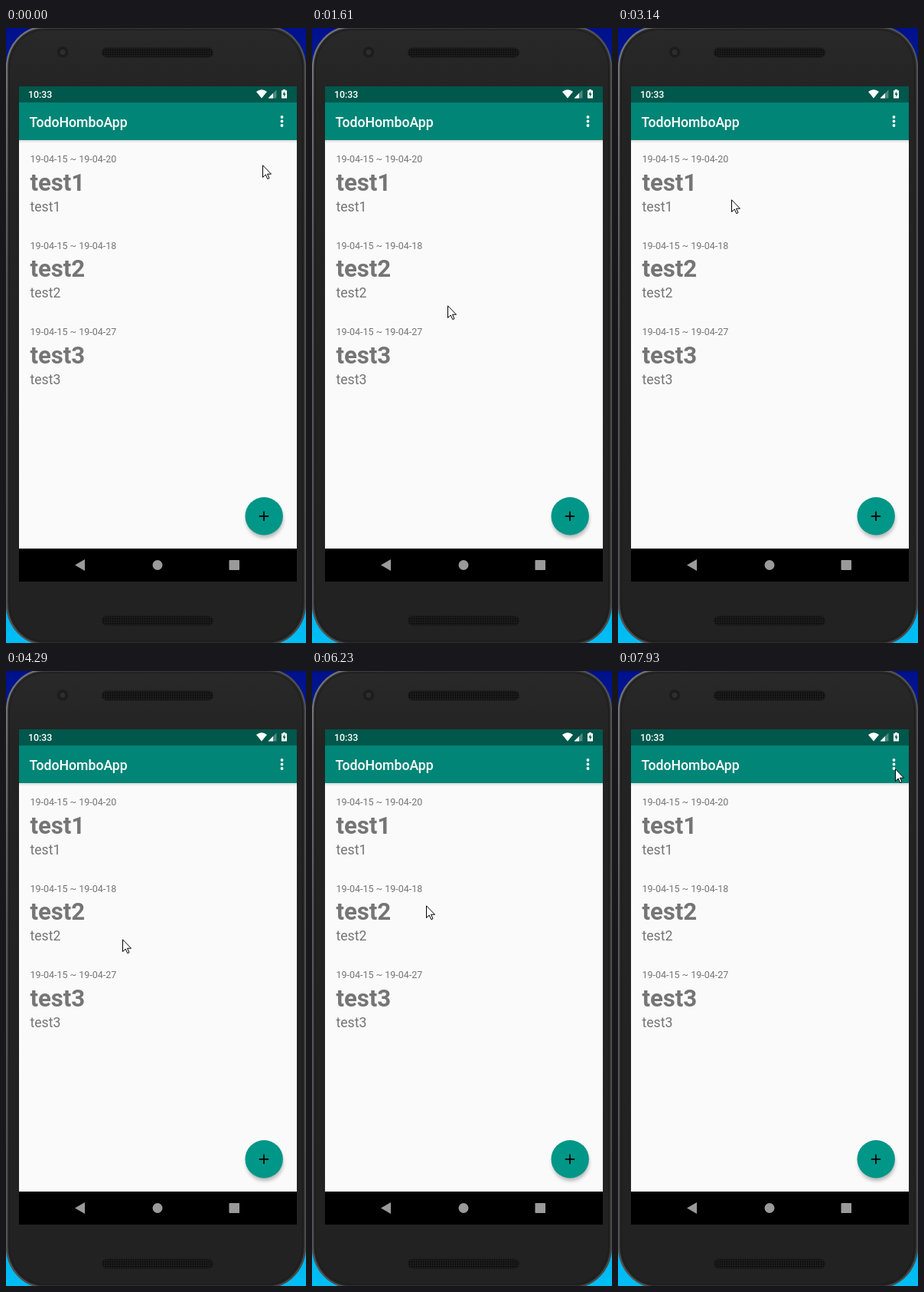
Write an HTML page that moves like this. It is 392 by 801 pixels and loops after 8000 ms.

```html
<!DOCTYPE html>
<html lang="en">
<head>
<meta charset="utf-8">
<title>Memo list</title>
<style>
html, body { margin: 0; width: 100%; height: 100%; overflow: hidden; }
svg { display: block; width: 392px; height: 801px; font-family: Roboto, sans-serif; }
.date { font-size: 12.5px; }
.head { font-size: 31.2px; font-weight: 700; }
.note { font-size: 17.66px; }
.bar { fill: #fff; font-weight: 500; }
</style>
</head>
<body>
<svg viewBox="0 0 392 801">
  <defs>
    <linearGradient id="sky" x2="0" y2="1">
      <stop stop-color="#00108c"/><stop offset=".5" stop-color="#0060c0"/><stop offset="1" stop-color="#00bff5"/>
    </linearGradient>
    <linearGradient id="shell" x2="0" y2="1">
      <stop stop-color="#292929"/><stop offset=".12" stop-color="#232323"/><stop offset="1" stop-color="#222"/>
    </linearGradient>
    <linearGradient id="rim" x2="1" y2="1">
      <stop stop-color="#777"/><stop offset=".2" stop-color="#555"/><stop offset="1" stop-color="#484848"/>
    </linearGradient>
    <linearGradient id="drop" x2="0" y2="1">
      <stop stop-opacity=".13"/><stop offset="1" stop-opacity="0"/>
    </linearGradient>
    <pattern id="mesh" width="3" height="3" patternUnits="userSpaceOnUse">
      <rect width="3" height="3" fill="#1d1d1d"/><circle cx="1.5" cy="1.5" r="1" fill="#070707"/>
    </pattern>
    <filter id="blur" x="-30%" y="-30%" width="160%" height="160%"><feGaussianBlur stdDeviation="2.6"/></filter>
  </defs>

  <rect width="392" height="801" fill="url(#sky)"/>
  <rect x="1" y="-1" width="390" height="803" rx="48" ry="53" fill="url(#shell)" stroke="url(#rim)" stroke-width="2.5"/>
  <rect x="4.5" y="2.5" width="383" height="796" rx="45" ry="50" fill="none" stroke="#1b1b1b"/>
  <g fill="url(#mesh)" stroke="#191919">
    <rect x="125.5" y="26" width="145" height="12" rx="6"/>
    <rect x="125.5" y="766" width="145" height="12" rx="6"/>
  </g>
  <circle cx="74" cy="31.5" r="7.5" fill="#1c1c1c" stroke="#262626"/>
  <circle cx="74" cy="31.5" r="3.5" fill="#2c2e32"/>

  <rect x="17" y="76" width="363" height="645" fill="#fafafa"/>
  <rect x="17" y="76" width="363" height="21" fill="#00574b"/>
  <rect x="17" y="97" width="363" height="49" fill="#008577"/>
  <rect x="17" y="146" width="363" height="4" fill="url(#drop)"/>
  <rect x="17" y="678" width="363" height="43"/>

  <text class="bar" x="29" y="91" font-size="12.36">10:33</text>
  <text class="bar" x="30.5" y="128.5" font-size="17.66">TodoHomboApp</text>
  <g fill="#fff">
    <path d="M327 83q7-5.5 14 0l-7 8.500z"/>
    <path d="M353.5 80.5v11h-11z" opacity=".3"/>
    <path d="M349 85v6.5h-6.500z"/>
    <path d="M362 80h3v1.2h2v10.300h-7V81.2h2z"/>
  </g>
  <path d="M364 82.5l-2.5 4.2h1.7v3.300l2.5-4.400h-1.700z" fill="#00574b"/>
  <path d="M360.5 116v12" stroke="#fff" stroke-width="3.8" stroke-linecap="round" stroke-dasharray="0 5.5"/>

  <g id="list" fill="#757575"></g>

  <circle cx="338" cy="640" r="24" opacity=".28" filter="url(#blur)"/>
  <circle cx="337.2" cy="635.8" r="24.7" fill="#009688"/>
  <path d="M330.8 635.8h12.4M337 629.6v12.4" stroke="#000" stroke-width="1.7"/>

  <g fill="#9a9a9a">
    <path d="M90 699.5L103 692v15z"/>
    <circle cx="198" cy="699.5" r="6.5"/>
    <rect x="291.5" y="693" width="13.5" height="13" rx=".8"/>
  </g>

  <path id="cursor" d="M.5 .8V16.5L4.2 13 6.800 18.600 9 17.600 6.500 12.200H11.500Z" fill="#fff" stroke="#000"/>
</svg>
<script>
const LOOP = 8000, RATE = 13 / 1000, LEAD = 18;

document.getElementById("list").innerHTML = [20, 18, 27].map((day, i) => {
  const line = (cls, y, text) => `<text class="${cls}" x="31.4" y="${y + i * 112.5}">${text}</text>`;
  const name = "test" + (i + 1);
  return line("date", 175, "19-04-15 ~ 19-04-" + day) + line("head", 211.5, name) + line("note", 238.5, name);
}).join("");

// Each stroke runs evenly through its points, then the pointer rests until the next one.
const stroke = (start, ticks, ...points) => ({ start, ticks, points });
const strokes = [
  stroke(0, 11, [153, 300], [183, 433]),
  stroke(16, 9, [199, 440], [166, 322], [133, 205]),
  stroke(29, 1, [114, 172]),
  stroke(30, 10, [157, 188], [146, 202]),
  stroke(40, 6, [156, 325]),
  stroke(55, 1, [152, 349]),
  stroke(56, 10, [150, 428], [144, 172]),
  stroke(76, 5, [149, 305]),
  stroke(81, 6, [160, 349], [83, 197]),
  stroke(87, 6, [38, 144]),
  stroke(93, 4, [325, 154]),
  stroke(98, 5, [362, 127])
];
let from = [335, 178];
for (const s of strokes) {
  s.points.unshift(from);
  from = s.points.at(-1);
}

function pointerAt(tick) {
  const { start, ticks, points } = strokes.findLast(s => s.start <= tick);
  const pos = Math.min((tick - start) / ticks, 1) * (points.length - 1);
  const i = Math.min(Math.floor(pos), points.length - 2);
  return points[i].map((v, axis) => Math.round(v + (points[i + 1][axis] - v) * (pos - i)));
}

const cursor = document.getElementById("cursor");
function draw(now) {
  const tick = Math.floor((now % LOOP + LEAD) * RATE);
  cursor.setAttribute("transform", `translate(${pointerAt(tick)})`);
  requestAnimationFrame(draw);
}
draw(performance.now());
</script>
</body>
</html>
```
